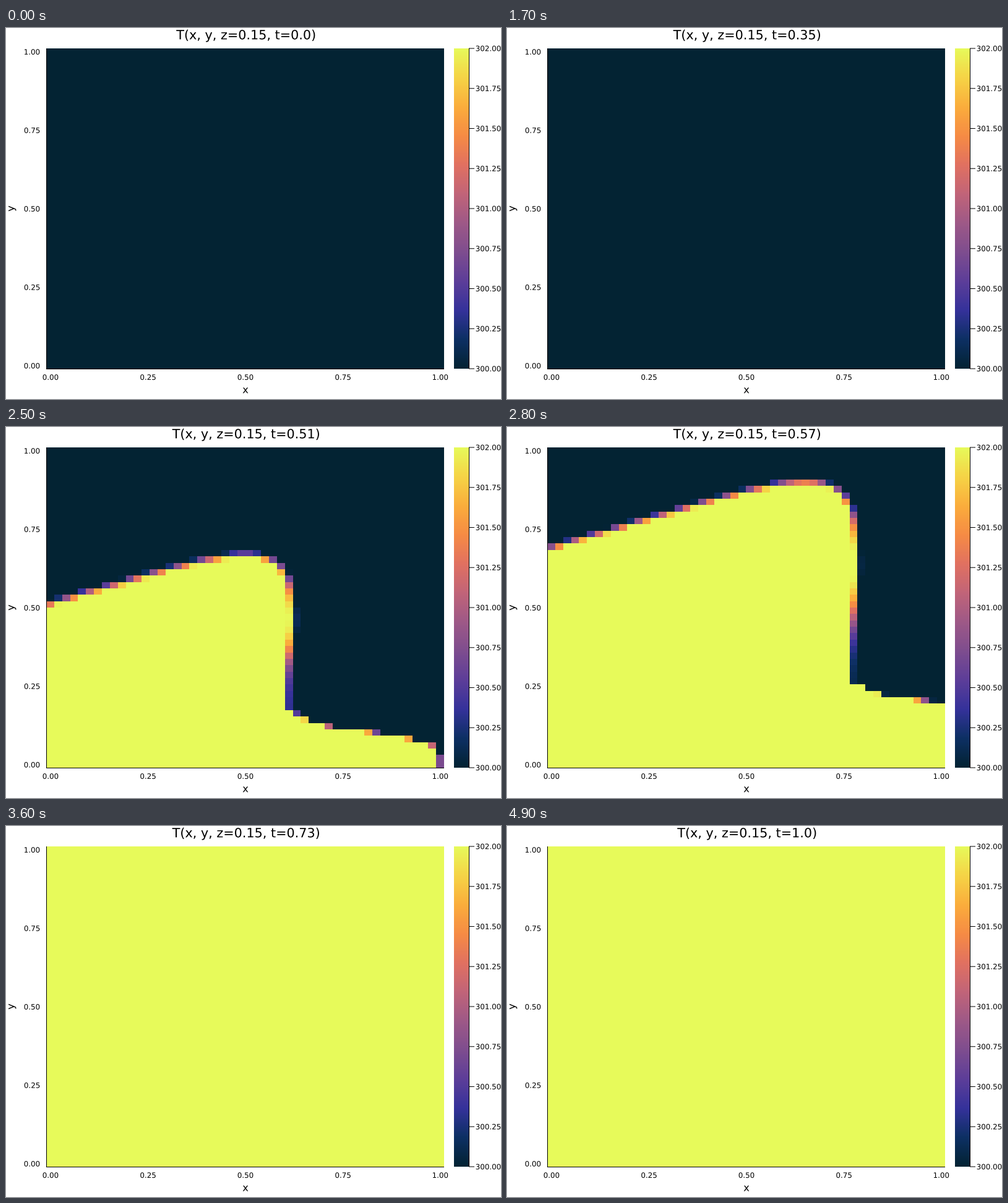
A matplotlib script that plays this animation: 800 px wide and 600 px high, repeating every 5 s.

```python
import numpy as np
import matplotlib.pyplot as plt
from matplotlib.animation import FuncAnimation
from matplotlib.colors import LinearSegmentedColormap
from matplotlib.patches import PathPatch
from matplotlib.textpath import TextPath
from matplotlib.transforms import Affine2D

W, H, DPI = 800, 600, 100
FRAMES, INTERVAL = 50, 100
N = 50  # heat map cells per side
LEFT, RIGHT, TOP, BOTTOM = 65, 708, 33, 551
CELL_W, CELL_H = (RIGHT - LEFT) / N, (BOTTOM - TOP) / N
CAP = 0.729  # digit height in ems

THERMAL = LinearSegmentedColormap.from_list("thermal", [
    "#032333", "#0d3064", "#35329b", "#5d3e99", "#7e4d8f", "#9e5987",
    "#c16479", "#e17161", "#f68b45", "#fbad3c", "#f6d346", "#e7fa5a"])

u, v = np.meshgrid(np.arange(N) + 0.5, np.arange(N) + 0.5)


def ramp(distance, width):
    return np.clip(0.5 + distance / width, 0, 1)


def body(k, lag):
    """Sheared superellipse growing from the lower left corner."""
    height = 25.6 + 2.87 * k - 1.3 * lag
    reach = 31.35 + 2.6 * k - 2.85 * lag
    slope = 0.37 - 0.1 * lag
    power = max(2, 6 + 0.35 * k - 1.2 * lag)
    waist = 0.55 * (1 - min(lag, 1)) * (1 - np.tanh((v / height - 0.7) / 0.15))
    lift = np.maximum(v - slope * u, 0) / height
    level = 1 - ((u / (reach - waist))**power + lift**power)**(1 / power)
    return level / np.hypot(*np.gradient(level)), reach


def foot(k, lag, reach):
    """Thin tongue running ahead along the floor."""
    nose = 49.45 + 3.3 * k + 0.33 * k**2
    top = 2.2 + 1.35 * k + 1.35 * np.maximum(nose - u, 0)**0.42
    corner = (1.9 + 1.3 * lag) * np.exp(-np.maximum(u - reach, 0) / 2)
    return np.minimum(top + corner - v, nose - u)


def temperature(i):
    """Heat map scaled so that 0 is 300 and 1 is 302."""
    k = i - 25
    if k < -6:
        return np.zeros((N, N))
    if k > 10:
        return np.ones((N, N))
    lag = np.exp(-(k + 4) / 1.5)  # ignition, soon forgotten
    body_distance, reach = body(k, lag)
    return np.maximum(ramp(body_distance, 1 + 1.2 * lag),
                      ramp(foot(k, lag, reach), 0.35))


fig = plt.figure(figsize=(W / DPI, H / DPI), dpi=DPI, facecolor="white")
ax = fig.add_axes([0, 0, 1, 1])


def text_path(text, x, baseline, px, align=0.5, angle=0):
    """Outlined text; align is the part of its width left of x."""
    path = TextPath((0, 0), text, size=px, prop={"family": "DejaVu Sans"})
    box = path.get_extents()
    move = Affine2D().translate(-box.x0 - align * box.width, 0).scale(1, -1)
    return move.rotate_deg(-angle).translate(x, baseline).transform_path(path)


def label(*args, **kw):
    return ax.add_patch(PathPatch(text_path(*args, **kw), fc="black", lw=0, snap=False))


def line(xs, ys):
    ax.plot(xs, ys, color="black", lw=72 / DPI, solid_capstyle="butt", snap=False)


def picture(data, left, right):
    return ax.imshow(data, cmap=THERMAL, vmin=0, vmax=1, origin="lower",
                     extent=(left, right, BOTTOM, TOP), aspect="auto",
                     interpolation="nearest")


heat = picture(temperature(0), LEFT, RIGHT)
picture(np.linspace(0, 1, 256)[:, None], 724, 748)
line([LEFT + 0.5] * 2, [TOP, BOTTOM + 1])
line([LEFT, RIGHT], [BOTTOM + 0.5] * 2)
line([748.5] * 2, [TOP, BOTTOM])

TICK_PX, LABEL_PX, TITLE_PX = 11.85, 16.3, 20.74
HALF_CAP = CAP * TICK_PX / 2
for part in np.linspace(0, 1, 5):
    x = LEFT + CELL_W * (0.5 + part * (N - 1))
    y = BOTTOM - CELL_H * (0.5 + part * (N - 1))
    label(f"{part:.2f}", x + 0.5, 569, TICK_PX)
    label(f"{part:.2f}", 54.3, y + HALF_CAP + 0.4, TICK_PX, align=1)
for part in np.linspace(0, 1, 9):
    y = BOTTOM - (BOTTOM - TOP) * part
    line([748, 757], [y, y])
    label(f"{300 + 2 * part:.2f}", 759.6, y + HALF_CAP, TICK_PX, align=0)

label("x", 387, 590.5, LABEL_PX)
label("y", 13, 292, LABEL_PX, angle=90)


def title_path(i):
    time = round(i / (FRAMES - 1), 2)
    return text_path(f"T(x, y, z=0.15, t={time})", 387.3, 18.3, TITLE_PX)


title = ax.add_patch(PathPatch(title_path(0), fc="black", lw=0, snap=False))
ax.set_xlim(0, W)
ax.set_ylim(H, 0)
ax.axis("off")


def update(i):
    heat.set_data(temperature(i))
    title.set_path(title_path(i))
    return heat, title


anim = FuncAnimation(fig, update, frames=FRAMES, interval=INTERVAL, repeat=True,
                     repeat_delay=0)
plt.show()
```
